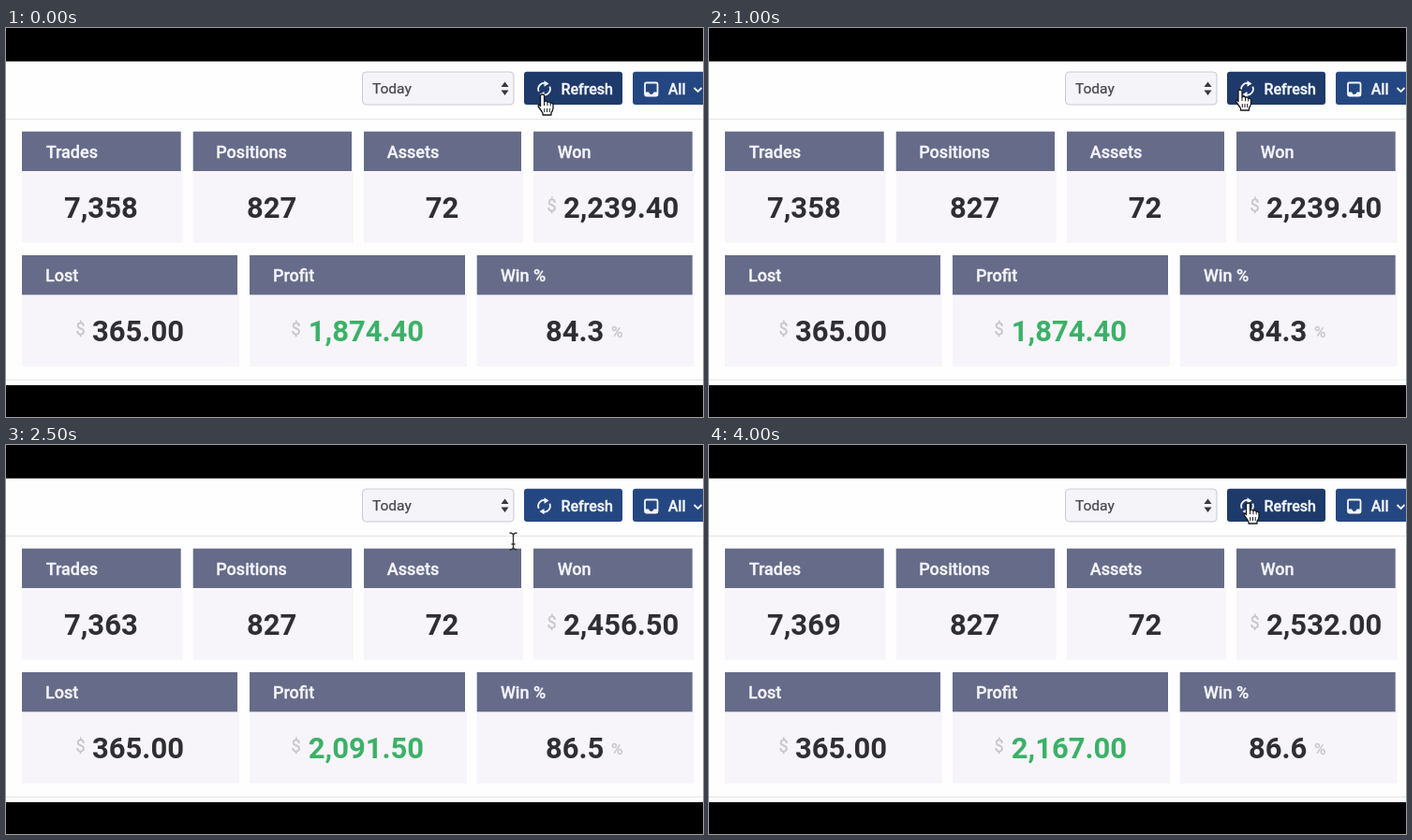
Write an HTML page that moves like this. It is 744 by 416 pixels and loops after 4.25 s.

```html
<!DOCTYPE html>
<html lang="en">
<head>
<meta charset="utf-8">
<title>Trading dashboard</title>
<style>
  html, body { margin: 0; width: 100%; height: 100%; overflow: hidden; background: #000; }
  svg { display: block; width: 744px; height: 416px; }
  text { font-family: Roboto, Arial, sans-serif; white-space: pre; }
  .title { font-size: 18px; font-weight: 500; fill: #f5f5fa; stroke: #f5f5fa; stroke-width: .35; }
  .value { font-size: 31px; font-weight: 700; fill: #2f2e33; }
  .unit { font-size: 18px; fill: #c6c5ca; stroke: #c6c5ca; stroke-width: .3; }
  .button { font-size: 16px; font-weight: 500; fill: #f4f6fb; stroke: #f4f6fb; stroke-width: .35; }
  .line { fill: none; stroke: #f4f6fb; stroke-width: 1.8; }
</style>
</head>
<body>
<svg id="stage" viewBox="0 0 744 416">
  <rect width="744" height="416"/>
  <rect y="35.7" width="744" height="346.3" fill="#fefefe"/>
  <path d="M0 97.3H744M0 376.3H744" stroke="#e3e3ea"/>

  <rect x="380.5" y="47" width="161.5" height="35" rx="4" fill="#f5f4f8" stroke="#c8cad2"/>
  <text x="391" y="69.7" font-size="15.5" fill="#47474d" stroke="#47474d" stroke-width=".25">Today</text>
  <path d="M528.5 63l4-5.5 4 5.5zM528.5 66.5l4 5.5 4-5.5z" fill="#38383c"/>

  <rect id="refresh" x="553" y="46.7" width="105" height="35.3" rx="3"/>
  <g id="spinner" class="line">
    <path d="M-5.8 2.6A6.3 6.3 0 0 1 1.8 -6M5.8 -2.6A6.3 6.3 0 0 1 -1.8 6"/>
    <path d="M0 -9l5 3.2-5 3.2zM0 9l-5-3.2 5-3.2z" fill="#f4f6fb" stroke="none"/>
  </g>
  <text class="button" x="592.5" y="70.7">Refresh</text>

  <path d="M744 46.7H672q-3 0-3 3V79q0 3 3 3H744z" fill="#254781"/>
  <rect class="line" x="682" y="58.5" width="13.5" height="14" rx="1.5"/>
  <path d="M682 68.5h4q1 2.5 2.8 2.5t2.8-2.5h4V73H682z" fill="#f4f6fb"/>
  <text class="button" x="706.7" y="70.7">All</text>
  <path class="line" d="M734.5 64l4 4 4-4"/>

  <g id="cards"></g>

  <g id="hand" fill="#fff" stroke="#18181c" stroke-width="1.3" stroke-linejoin="round">
    <path d="M-1 1Q1 -1 3 1V8Q5 6 6.5 8.5 8.5 7 9.7 9.5 12 8.5 12.5 11V15Q12 18 10.5 19.5V22H1.5V20Q0 17.5-3 13.5-4 11.5-2.5 11L-1 12.5Z"/>
    <path d="M3 8v4M6.5 8.8v3.4M9.7 9.8v2.6M3.3 15v4M6 15v4M8.7 15v4" stroke-width="1"/>
  </g>
  <path id="arrow" d="M0 0V17L4 13.4 7 20.5 10 19.2 7 12.3H12.3Z"
        fill="#111" stroke="#fff" stroke-width="1.2"/>
  <path id="beam" d="M-4 -9Q0 -9 0 -6 0 -9 4 -9M0 -6V6M-4 9Q0 9 0 6 0 9 4 9M-2 3H2"
        fill="none" stroke="#333" stroke-width="1.4"/>
</svg>
<script>
  const LOOP = 4250, STEP = 250;
  const byId = id => document.getElementById(id);

  function add(name, attrs, text = "") {
    const node = document.createElementNS("http://www.w3.org/2000/svg", name);
    for (const key in attrs) node.setAttribute(key, attrs[key]);
    node.textContent = text;
    byId("cards").append(node);
    return node;
  }

  // title, x, y, width, title x, value x, unit, unit x
  const cards = [
    ["Trades", 17, 110.7, 169.7, 42.7, 62],
    ["Positions", 199.7, 110.7, 169.3, 224.2, 257],
    ["Assets", 382, 110.7, 168, 406.7, 447.8],
    ["Won", 563, 110.7, 169.7, 588.7, 595],
    ["Lost", 17, 243, 230, 42, 92],
    ["Profit", 260, 243, 230, 285, 322.8],
    ["Win %", 502.7, 243, 230, 528, 576]
  ];
  const units = { Won: ["$", 577.5], Lost: ["$", 74.5], Profit: ["$", 304.5], "Win %": ["%", 646] };

  const values = cards.map(([title, x, y, width, titleX, valueX]) => {
    add("rect", { x, y: y + 42, width: width + 2, height: 77, fill: "#f7f5f9" });
    add("rect", { x, y, width, height: 42.3, fill: "#656b89" });
    add("text", { x: titleX, y: y + 28, class: "title" }, title);
    if (units[title]) {
      const [unit, unitX] = units[title];
      const small = unit === "%";
      add("text", { x: unitX, y: y + (small ? 88 : 85), class: "unit",
        style: small ? "font-size:17px" : "" }, unit);
    }
    return add("text", { x: valueX, y: y + 92, class: "value",
      style: title === "Profit" ? "fill:#3bb168" : "" });
  });

  const results = [
    [0, "7,358", "2,239.40", "1,874.40", "84.3"],
    [2000, "7,363", "2,456.50", "2,091.50", "86.5"],
    [3250, "7,369", "2,532.00", "2,167.00", "86.6"]
  ];

  // start time, pointer shape, x, y
  const pointer = [
    [0, "hand", 571.5, 71], [500, "hand", 568, 69], [750, "hand", 562.5, 67],
    [1000, "hand", 566, 66], [1250, "hand", 574, 63], [1500, "arrow", 575, 62],
    [2000, "hand", 574.5, 63], [2250, "arrow", 557, 85], [2500, "beam", 541.5, 103],
    [2750, "hand", 571, 66], [3000, "arrow", 571, 64], [3250, "hand", 568, 65],
    [3500, "arrow", 507.5, 56.5], [3750, "arrow", 543, 60], [4000, "hand", 574.5, 62]
  ];

  const current = (list, time) => list.findLast(entry => entry[0] <= time);

  function render(now) {
    const time = Math.floor(now % LOOP / STEP) * STEP;
    const [, trades, won, profit, rate] = current(results, time);
    [trades, "827", "72", won, "365.00", profit, rate]
      .forEach((text, i) => values[i].textContent = text);

    const [, shape, x, y] = current(pointer, time);
    for (const id of ["hand", "arrow", "beam"]) {
      byId(id).style.display = id === shape ? "" : "none";
    }
    byId(shape).setAttribute("transform", `translate(${x} ${y})`);

    const loading = time === 1500 || time === 1750 || time === 3000;
    const color = loading ? "#919fbf" : shape === "hand" ? "#1d3a6a" : "#254781";
    byId("refresh").setAttribute("fill", color);
    byId("spinner").setAttribute("opacity", loading ? 0.6 : 1);
    byId("spinner").setAttribute("transform",
      `translate(574.5 65.3) rotate(${loading ? time * 0.24 : 0})`);
  }

  const start = performance.now();
  function tick() {
    render(performance.now() - start);
    requestAnimationFrame(tick);
  }
  tick();
</script>
</body>
</html>
```
